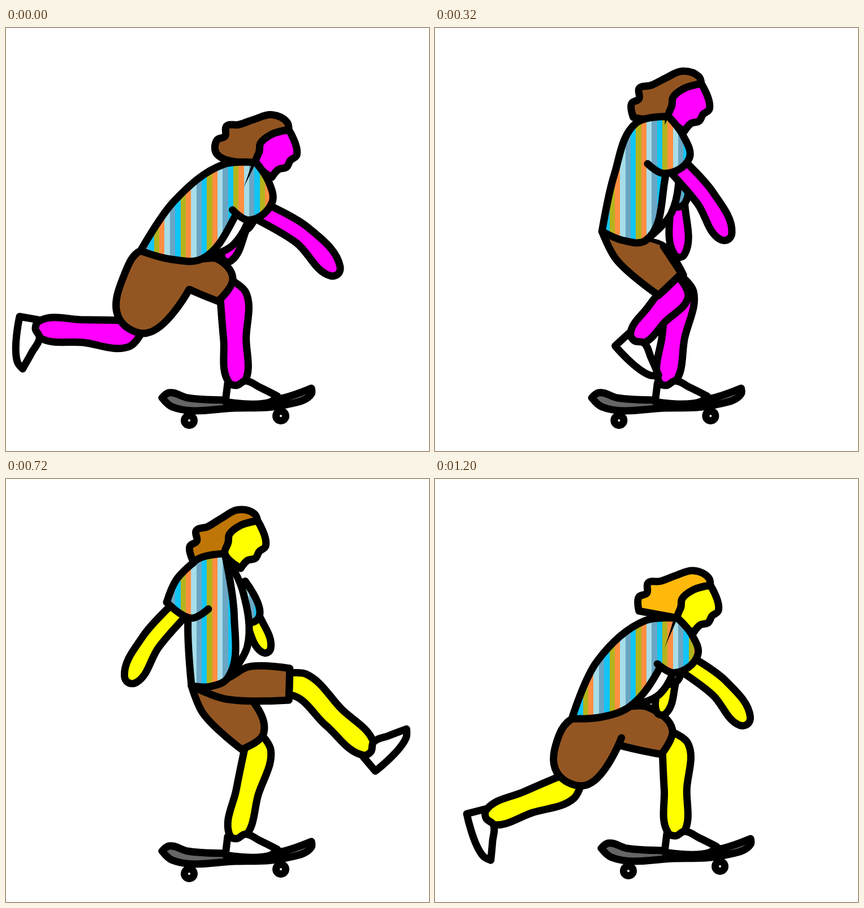
An HTML page with a canvas that plays this animation: 748 px wide and 748 px high, repeating every 1280 ms.

```html
<!DOCTYPE html>
<html lang="en">
<head>
<meta charset="utf-8">
<title>Skater push</title>
<style>
  html, body { margin: 0; width: 100%; height: 100%; overflow: hidden; background: #fff; }
  canvas { display: block; width: 100vmin; height: 100vmin; }
</style>
</head>
<body>
<canvas id="stage" width="748" height="748"></canvas>
<script>
const ctx = document.getElementById('stage').getContext('2d');
const STEP = 80, STEPS = 16;
const HAIR = ['#915420', '#bf7607', '#ff9d00', '#ffb90a'];
const BANDS = ['#a6dde8', '#6aa6c4', '#10c4f5', '#b3b41c', '#ff8e42'];
const BROWN = '#935622', WHITE = '#fff';

// Key poses of the skeleton; everything else follows from these joints
const JOINTS = ['head', 'seat', 'belly', 'cuff', 'hand', 'farHand', 'hem', 'ankle', 'farHem', 'farAnkle'];
const pose = (step, bow, text) => ({ step, bow, at: text.split(' ').map(p => p.split(',').map(Number)) });
const POSES = [
  pose(0, 18, '500,180 238,394 347,408 450,324 582,430 390,408 224,526 58,532 388,463 408,626'),
  pose(3, 8, '485,126 286,378 362,405 458,267 576,380 418,425 374,478 277,530 417,450 408,627'),
  pose(6, 15, '442,50 308,325 393,312 348,206 353,352 460,333 480,402 507,580 429,466 412,624'),
  pose(9, 8, '445,74 328,366 392,352 306,232 220,354 460,302 501,363 641,478 436,464 408,630'),
  pose(11, 15, '450,80 292,354 352,318 300,232 233,360 428,342 445,400 518,563 397,463 404,619'),
  pose(13, 42, '463,172 240,409 318,380 331,334 414,478 378,388 332,518 259,673 405,494 418,627'),
  pose(15, 25, '487,188 242,424 345,402 444,327 548,428 400,412 241,530 96,598 410,465 426,625'),
];

// Shapes that keep their form, relative to forehead, ankle and board centre
const HAIR_BACK = [[-112, 74], [-118, 50], [-106, 40], [-108, 22], [-88, 14], [-64, -2], [-36, -18], [-6, -12]];
const HAIRLINE = [[0, 0], [-30, 8], [-50, 24], [-52, 38], [-58, 58]];
const PROFILE = [[-30, 84], [-18, 70], [-4, 66], [3, 54], [14, 45]];
const SHOE = [[-16, 2], [0, 6], [15, -2], [42, 10], [72, 25], [60, 35], [-20, 35]];
const DECK = [[-130, -36], [-118, -45], [-85, -36], [-20, -32], [76, -34], [134, -53], [134, -43], [90, -24], [0, -18], [-112, -20]];

// Vectors
const add = (a, b, k = 1) => [a[0] + b[0] * k, a[1] + b[1] * k];
const sub = (a, b) => add(a, b, -1);
const mix = (a, b, t) => add(a, sub(b, a), t);
const unit = v => { const l = Math.hypot(...v) || 1; return [v[0] / l, v[1] / l]; };
const side = v => { const [x, y] = unit(v); return [y, -x]; };
const dot = (a, b) => a[0] * b[0] + a[1] * b[1];
const turn = ([x, y], a) => [x * Math.cos(a) - y * Math.sin(a), x * Math.sin(a) + y * Math.cos(a)];
// Point at fraction t from a to b, pushed sideways by d
const off = (a, b, t, d) => add(mix(a, b, t), side(sub(b, a)), d);

// Stripes stay fixed to the stage while the shirt moves over them
const stripes = ctx.createLinearGradient(0, 0, 748, 0);
for (let i = 0; i < 80; i++) {
  stripes.addColorStop(i / 80, BANDS[i % 5]);
  stripes.addColorStop((i + 1) / 80, BANDS[i % 5]);
}

// Smooth outline through the points, with sharp corners where it turns hard
function shape(fill, pts, open = false) {
  const n = pts.length;
  const dirs = pts.map((p, i) => {
    const u = unit(sub(p, pts[(i + n - 1) % n])), v = unit(sub(pts[(i + 1) % n], p));
    const loose = open && (i === 0 || i === n - 1);
    return loose || dot(u, v) < 0.2 ? [0, 0] : unit(add(u, v));
  });
  ctx.beginPath();
  ctx.moveTo(...pts[0]);
  for (let i = 0; i < (open ? n - 1 : n); i++) {
    const j = (i + 1) % n, k = 0.34 * Math.hypot(...sub(pts[j], pts[i]));
    ctx.bezierCurveTo(...add(pts[i], dirs[i], k), ...add(pts[j], dirs[j], -k), ...pts[j]);
  }
  if (!open) ctx.closePath();
  ctx.fillStyle = fill;
  ctx.fill();
  ctx.stroke();
}

// Tapering tube along a chain of joints
function limb(fill, joints, radii) {
  const last = joints.length - 1;
  const dirs = joints.map((_, i) => unit(sub(joints[Math.min(i + 1, last)], joints[Math.max(i - 1, 0)])));
  const edge = s => joints.map((p, i) => add(p, side(dirs[i]), s * radii[i]));
  const tip = add(joints[last], dirs[last], radii[last] * 0.6);
  shape(fill, [...edge(1), tip, ...edge(-1).reverse()]);
}

function wheel(x, y) {
  ctx.beginPath();
  ctx.arc(x, y, 8.5, 0, 7);
  ctx.fillStyle = WHITE;
  ctx.fill();
  ctx.stroke();
}

const shoe = (ankle, angle) => shape(WHITE, SHOE.map(p => add(ankle, turn(p, angle))));

// Joints at a step, eased through the key poses around the loop
function skeleton(step) {
  const n = POSES.length;
  const key = i => {
    const lap = Math.floor(i / n), p = POSES[i - lap * n];
    return { t: p.step + lap * STEPS, v: [p.bow, ...p.at.flat()] };
  };
  let i = 0;
  while (key(i + 1).t <= step) i++;
  const [a, b, c, d] = [i - 1, i, i + 1, i + 2].map(key);
  const span = c.t - b.t, u = (step - b.t) / span;
  const v = b.v.map((p, j) => {
    const q = c.v[j];
    const m = (q - a.v[j]) / (c.t - a.t) * span, o = (d.v[j] - p) / (d.t - b.t) * span;
    return p + u * (m + u * (3 * (q - p) - 2 * m - o + u * (2 * (p - q) + m + o)));
  });
  const s = { bow: v[0] };
  JOINTS.forEach((name, j) => s[name] = v.slice(1 + 2 * j, 3 + 2 * j));
  return s;
}

function draw(step) {
  const s = skeleton(step);
  const skin = step % 2 ? '#ff0' : '#f0f';
  const hip = mix(s.seat, s.belly, 0.5);
  const throat = add(s.head, [-58, 58]);
  const spine = sub(throat, hip);
  const tilt = 0.35 * Math.atan2(spine[0], -spine[1]);
  const nape = add(throat, turn([-55, 18], tilt));
  const collar = mix(nape, throat, 0.5);

  function shin(hem, ankle) {
    const knee = add(hem, unit(sub(hem, hip)), 16);
    limb(skin, [hem, knee, mix(knee, ankle, 0.5), ankle], [20, 23, 20, 14]);
    return Math.atan2(ankle[1] - knee[1], ankle[0] - knee[0]) - Math.PI / 2;
  }
  function shortsLeg(hem, r, open) {
    const n = side(sub(hem, hip)), front = add(hem, n, r), back = add(hem, n, -r);
    shape(BROWN, [off(s.belly, front, 0.35, 14), front, back, off(s.seat, back, 0.35, -14), s.seat, s.belly], open);
  }

  ctx.fillStyle = WHITE;
  ctx.fillRect(0, 0, 748, 748);
  ctx.lineWidth = 13;
  ctx.lineCap = ctx.lineJoin = 'round';

  // Board follows the standing foot
  const board = add(s.farAnkle, [-2, 64]);
  wheel(...add(board, [-82, 4]));
  wheel(...add(board, [80, -4]));
  shape('#666', DECK.map(p => add(board, p)));

  // Legs; the pushing foot is square to its shin and flattens near the ground
  shin(s.farHem, s.farAnkle);
  shoe(s.farAnkle, 0);
  shortsLeg(s.farHem, 24, false);
  const angle = shin(s.hem, s.ankle);
  shoe(s.ankle, angle * Math.max(0, Math.min(1, (690 - s.ankle[1]) / 60)));
  shortsLeg(s.hem, 28, s.hem[0] < s.farHem[0]);

  // Far arm and undershirt
  const farShoulder = off(throat, s.belly, 0.25, 22);
  limb(skin, [farShoulder, mix(farShoulder, s.farHand, 0.5), s.farHand], [14, 13, 9]);
  limb(stripes, [farShoulder, mix(farShoulder, s.farHand, 0.5)], [14, 15]);
  shape(WHITE, [throat, off(throat, s.belly, 0.3, 30), off(throat, s.belly, 0.75, 36), s.belly]);

  // Head; the hair swings back as the body leans
  const onHead = p => add(s.head, p);
  shape(HAIR[step % 4], [...HAIR_BACK.map(p => turn(p, tilt)), ...HAIRLINE].map(onHead));
  shape(skin, [...HAIRLINE, ...PROFILE].map(onHead));

  // Shirt
  shape(stripes, [nape, throat, off(throat, s.belly, 0.5, 14), s.belly,
    off(s.seat, s.belly, 0.5, -8), s.seat, off(nape, s.seat, 0.5, -s.bow)]);

  // Near arm, its sleeve hung from the front or back of the collar
  const reach = sub(s.hand, s.cuff), drop = sub(s.cuff, collar);
  const elbow = off(s.cuff, s.hand, 0.5, reach[0] * 0.1);
  limb(skin, [s.cuff, elbow, s.hand], [16, 17, 12]);
  const facing = dot(drop, side(sub(hip, collar))) > 0 ? 1 : -1;
  const across = side(add(unit(drop), unit(reach)));
  const outer = add(s.cuff, across, 26 * facing), inner = add(s.cuff, across, -26 * facing);
  const crease = add(inner, unit(sub(add(unit(drop), across, 0.6 * facing), [0, 0])), -34);
  const top = facing > 0 ? throat : nape;
  shape(stripes, [crease, inner, outer, off(top, outer, 0.5, 8 * facing), top], true);
}

function tick() {
  draw(Math.floor(performance.now() / STEP) % STEPS);
  requestAnimationFrame(tick);
}
tick();
</script>
</body>
</html>
```
